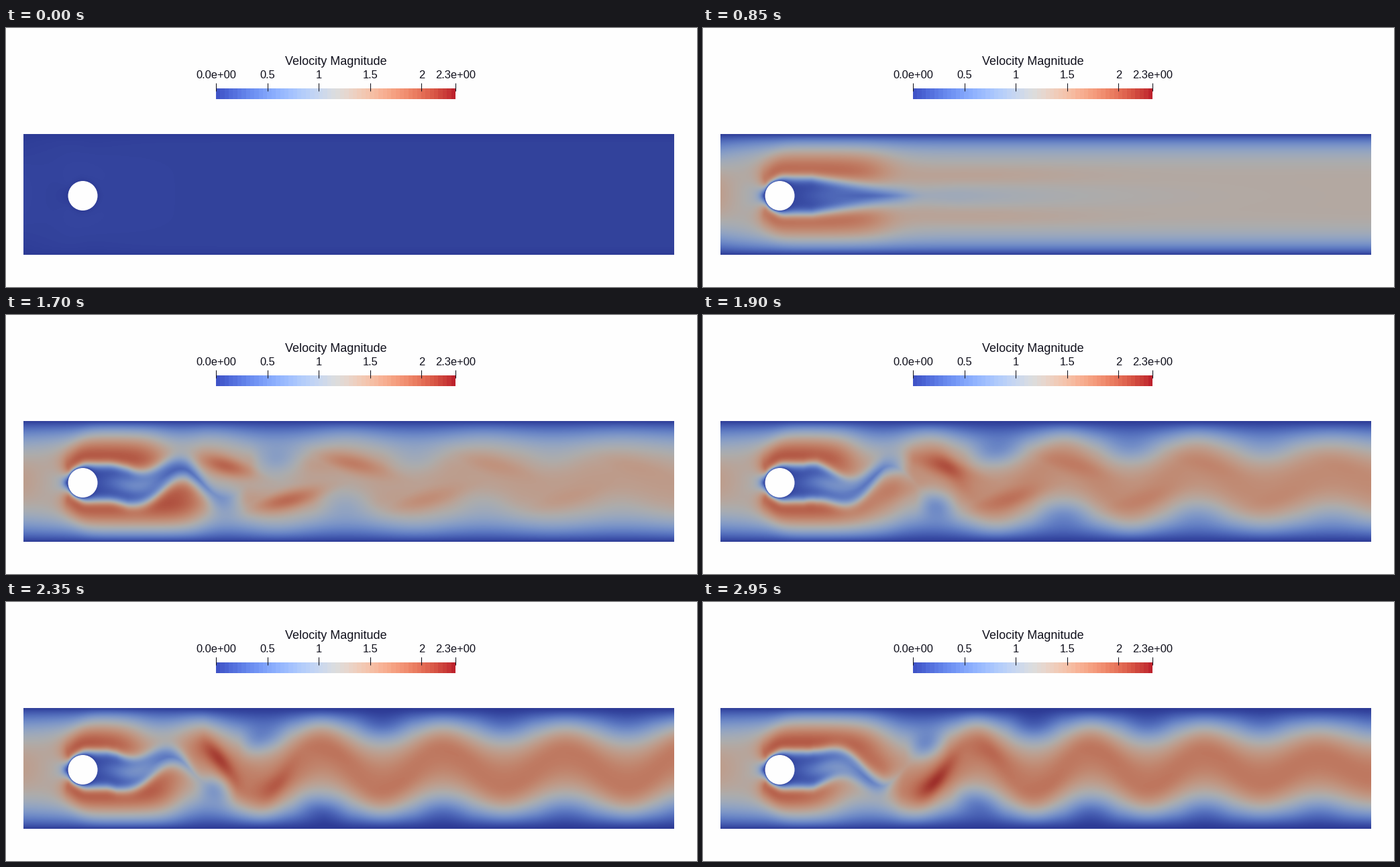
Write a matplotlib script that moves like this. It is 1030 px wide and 386 px high and loops after 3000 ms.

```python
import numpy as np
import matplotlib.pyplot as plt
from matplotlib.animation import FuncAnimation
from matplotlib.colors import ListedColormap
from matplotlib.patches import Circle

W, H, DPI = 1030, 386, 100
FRAMES, INTERVAL = 60, 50
LEFT, RIGHT, TOP, BOTTOM = 26, 996, 158, 338
CX, CY, R = 114.5, 250, 22
VMAX = 2.33
TAU = 2 * np.pi
INK = "#10101c"

# Sample points: X in stage pixels, y measured upwards from the cylinder axis.
X, Y = np.meshgrid(np.arange(LEFT + 1, RIGHT, 2.0), np.arange(TOP + 1, BOTTOM, 2.0))
y = CY - Y
Y_UP, Y_LOW = CY - TOP, BOTTOM - CY
wall = np.minimum(Y_UP - y, y + Y_LOW)
span = (BOTTOM - Y) / (BOTTOM - TOP)
z = (X - CX) + 1j * y
dist = np.maximum(np.abs(z) - R, 0)
potential = np.abs(1 - (R / np.where(np.abs(z) < R, R, z)) ** 2)
potential = np.minimum(potential, 1.12)


def sig(a):
    return 1 / (1 + np.exp(-np.clip(a, -40, 40)))


def bell(a, width):
    return np.exp(-((a / width) ** 2))


def pos(a):
    return np.maximum(a, 0) ** 1.5


def ease(n, start, end):
    u = min(1, max(0, (n - start) / (end - start)))
    return u * u * (3 - 2 * u)


def speed(n):
    ramp = min(1, 0.05 + 0.081 * n)      # inflow
    grow = min(1, n / 26) ** 0.7         # steady wake gets longer
    shed = ease(n, 25, 36)               # wake starts to flap
    swell = ease(n, 24, 42)              # flapping reaches full size
    grown = ease(n, 32, 43)              # vortex street is complete

    # Waves leave the cylinder at a steady rate and spread downstream.
    psi = 0.306 * (n - 42) - 0.03 + 0.11 * (1 - ease(n, 32, 42))
    length = 207 - 37 * ease(n, 32, 56)
    behind = np.maximum(X - 380, 0) / length
    before = np.minimum(X - 380, 0)
    cycle = behind + before / 200 - psi
    wave = np.cos(TAU * cycle)
    pulse = np.cos(TAU * (behind + before / 140 - psi))

    # Channel flow whose fastest layer meanders.
    burst = 0.5 * grown * bell(X - 850 - 50 * (n - 42), 220)
    env = np.clip((X - 195) / 100, 0, 1) * (1 - 0.55 * np.maximum(X - 380, 0) / 520 + burst)
    mid = 2 + 35 * swell * env * wave
    off = y - mid
    zeta = np.abs(off) / np.where(off > 0, Y_UP - mid, mid + Y_LOW)
    p = 2.2 + 3.8 * np.exp(-(n - 9) / 9)
    down = grown * sig((X - 270) / 25)
    core = (p + 1) / p * (1 + 0.2 * down)
    far = ramp * core * (1 - np.clip(zeta, 0, 1) ** p) ** (1 + 0.4 * down)
    inlet = np.exp(-(X - LEFT) / 45)
    far = far * (1 - inlet) + ramp * 6 * span * (1 - span) * inlet

    # Steady wake trail with faster bands on both sides.
    trail = 0.5 * ease(n, 10, 26) * (1 - ease(n, 26, 38))
    fade = sig((X - 310) / 20) * np.exp(-np.maximum(X - 380, 0) / 210)
    far *= 1 - trail * fade * bell(y, 15 + 0.03 * np.maximum(X - 300, 0))
    far += 0.5 * trail * bell(np.abs(y) - 31, 15) * bell(X - 400, 190) * sig((X - 300) / 20)

    # Shed streaks and slow pockets.
    lag = TAU * (cycle - 0.1 + (np.abs(y) - 25) * 0.0085)
    streak = 0.5 * shed * (1 - 0.9 * grown)
    streak = streak * np.exp(-np.maximum(X - 400, 0) / 260) * sig((X - 290) / 12)
    far += streak * (pos(np.cos(lag)) * bell(y - 26, 20) + pos(-np.cos(lag)) * bell(y + 23, 20))
    reach = 30 + 33 * grown * np.clip((X - 305) / 170, 0, 1)
    depth = 0.48 * shed * (1 - 0.4 * grown) * sig((X - 285) / 10)
    depth = depth * np.exp(-np.maximum(X - 400, 0) / (210 + 300 * grown))
    depth = depth * (1 + grown * bell(X - 315, 50))
    far -= depth * (pos(-pulse) * bell(y - reach, 20) + pos(pulse) * bell(y + reach - 3, 20))
    limb = np.cos(TAU * (cycle + 0.33)) ** 2
    far += 0.42 * grown * bell(X - 335, 75) * limb * bell(off, 19)

    # Fast lobes squeezed between the bubble and the walls.
    sway = -25 * shed * np.clip((X - 150) / 120, 0, 1) * pulse
    swing = 33 * shed * np.cos(TAU * (psi - 0.1))
    upper = sig((y - sway) / 8)
    stop = 140 + 175 * grow - 95 * swell + swing * (2 * upper - 1)
    front = 92 + 0.45 * (np.abs(y) - 25)
    lobe = sig((X - front) / 9) * sig((stop - X) / (30 - 14 * grow))
    peak = ramp * (1.5 + 0.56 * grow)
    near = peak * (1 - (1 - np.minimum(wall / 60, 1)) ** 1.9)
    v = far * (1 - lobe) + near * lobe
    v *= potential ** sig((CX - 2 - X) / 9)
    v *= 1 - np.exp(-dist / 3.5)

    # Slow bubble behind the cylinder.
    start = 110 + 95 * grow ** 2 - 40 * swell
    tip = 142 + 253 * grow - 97 * swell
    half = 27 * (1 - np.clip((X - start) / (tip - start), 0, 1))
    edge = 4 + 4 * np.clip((X - 160) / 150, 0, 1)
    bubble = sig((half - np.abs(y - sway)) / edge)
    bubble *= sig((tip - 18 - X) / 13) * sig((X - 112) / 4)
    swirl = 0.45 * grow ** 2 + 0.15 * swell
    inner = 0.04 + swirl * bell(X - 195, 45) * bell(y - 0.6 * sway, 14)
    v = v * (1 - bubble) + ramp * inner * bubble
    return np.clip(v, 0, 2.28)


warm = plt.get_cmap("coolwarm")
shaded = warm(np.linspace(0, 1, 256))
shaded[:, :3] *= 0.78

fig = plt.figure(figsize=(W / DPI, H / DPI), dpi=DPI, facecolor="#fefefe")
ax = fig.add_axes([0, 0, 1, 1])
ax.axis("off")

field = ax.imshow(speed(0), cmap=ListedColormap(shaded), vmin=0, vmax=VMAX,
                  extent=(LEFT, RIGHT, BOTTOM, TOP), interpolation="bilinear", aspect="auto")
ax.add_patch(Circle((CX, CY), R, color="#fefefe", lw=0, zorder=3))

# Colour legend
ax.imshow(np.linspace(0.02, 0.97, 56)[None, :], cmap=warm, vmin=0, vmax=1,
          extent=(313, 670, 106, 90), interpolation="nearest", aspect="auto")


def label(x, base, text, px):
    ax.text(x, base, text, fontsize=px * 72 / DPI, family="Liberation Sans",
            color=INK, ha="center", va="baseline")


label(491.5, 55, "Velocity Magnitude", 18)
for i, text in enumerate(["0.0e+00", "0.5", "1", "1.5", "2", "2.3e+00"]):
    x = min(313 + 76.6 * i, 670)
    label(x, 75, text, 16.5)
    ax.plot([x, x], [82, 94], color=INK, lw=0.75, solid_capstyle="butt")

ax.set_xlim(0, W)
ax.set_ylim(H, 0)


def draw(n):
    field.set_data(speed(n))
    return (field,)


anim = FuncAnimation(fig, draw, frames=FRAMES, interval=INTERVAL, repeat=True, blit=False)
plt.show()
```
